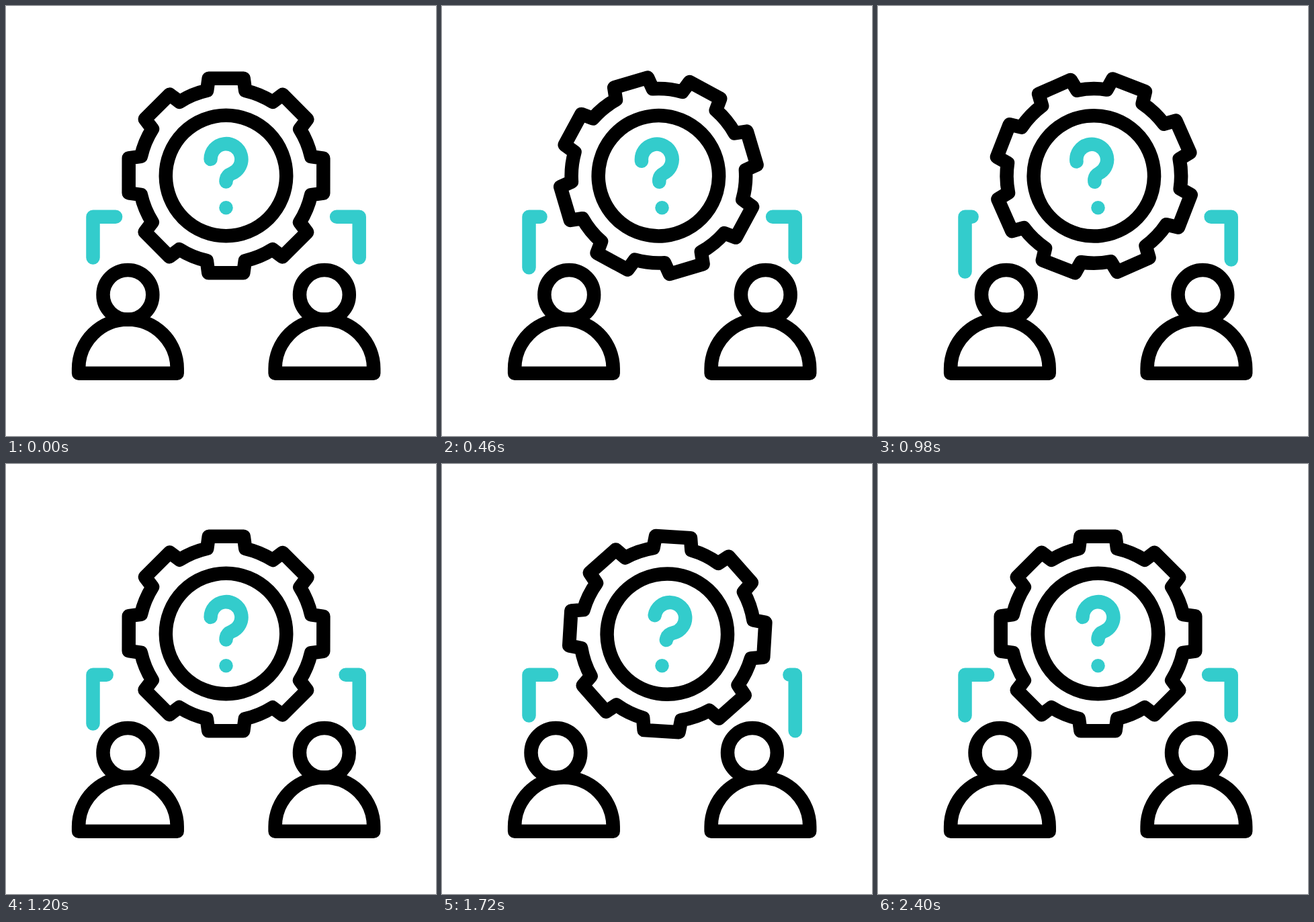
An HTML page that plays this animation: 640x640 px, repeating every 2420 ms.

```html
<!DOCTYPE html>
<html lang="en">
<head>
<meta charset="utf-8">
<title>Team question</title>
<style>
  html, body { margin: 0; width: 100%; height: 100%; overflow: hidden; background: #fff; }
  svg { display: block; width: 100%; height: 100%; }
  .line { fill: none; stroke: #000; stroke-width: 20.5; stroke-linecap: round; stroke-linejoin: round; }
  .teal { stroke: #3cc; }
</style>
</head>
<body>
<svg viewBox="0 0 640 640" class="line">
  <defs>
    <path id="body" d="M108.1 546.7V539.8A73.3 73.3 0 0 1 254.7 539.8V546.7Z"/>
    <circle id="head" cx="181.4" cy="429.8" r="36.9"/>
  </defs>
  <g id="tilt">
    <path id="gear"/>
    <circle cx="327.5" cy="252.5" r="89.7"/>
    <path class="teal" d="M304.6 228A22.9 22.9 0 1 1 336 249.3Q327.5 252.7 327.5 261.5"/>
  </g>
  <path class="teal" d="M327.5 300.3h.01"/>
  <path class="teal" id="left"/>
  <path class="teal" id="right"/>
  <use href="#body"/>
  <use href="#body" x="292.5"/>
  <g id="heads">
    <use href="#head"/>
    <use href="#head" x="292.5"/>
  </g>
</svg>
<script>
const LOOP = 2420, PHASE = 800, SPAN = 3 * PHASE;
const $ = id => document.getElementById(id);

function gearPath() {
  const tooth = [[-28.5, -126.6], [-26, -144.8], [26, -144.8], [28.5, -126.6]];
  let d = '';
  for (let i = 0; i < 8; i++) {
    const a = i * Math.PI / 4, c = Math.cos(a), s = Math.sin(a);
    tooth.forEach(([x, y], k) => {
      const cmd = k ? 'L' : i ? 'A129.8 129.8 0 0 1 ' : 'M';
      d += `${cmd}${(x * c - y * s).toFixed(2)} ${(x * s + y * c).toFixed(2)}`;
    });
  }
  return d + 'A129.8 129.8 0 0 1 -28.5 -126.6Z';
}

// Eased value through evenly spaced keys, one per phase
function ease(keys, t) {
  const i = Math.min(Math.floor(t / PHASE), 2), u = t / PHASE - i;
  return keys[i] + (keys[i + 1] - keys[i]) * u * u * (3 - 2 * u);
}

// Bracket sliding around its corner; dir points from the corner inward
function bracket(id, x, dir, k) {
  $(id).setAttribute('d', `M${x + dir * (33.6 - 27 * k)} 313.8H${x}V${374.4 + 24.3 * k}`);
}

function draw(now) {
  const t = Math.min(now % LOOP, SPAN);
  const sway = ease([0, 1, -1, 0], t);
  $('tilt').setAttribute('transform', `rotate(${-10 * sway} 327.5 300.3)`);
  $('gear').setAttribute('transform', `translate(327.5 252.5) rotate(${180 * t / SPAN})`);
  $('heads').setAttribute('transform', `translate(${12.8 * sway} 0)`);
  bracket('left', 129.5, 1, ease([0, 1, 0, 0], t));
  bracket('right', 525.7, -1, ease([0, 0, 1, 0], t));
}

$('gear').setAttribute('d', gearPath());
const start = performance.now();
function tick() {
  draw(performance.now() - start);
  requestAnimationFrame(tick);
}
tick();
</script>
</body>
</html>
```
